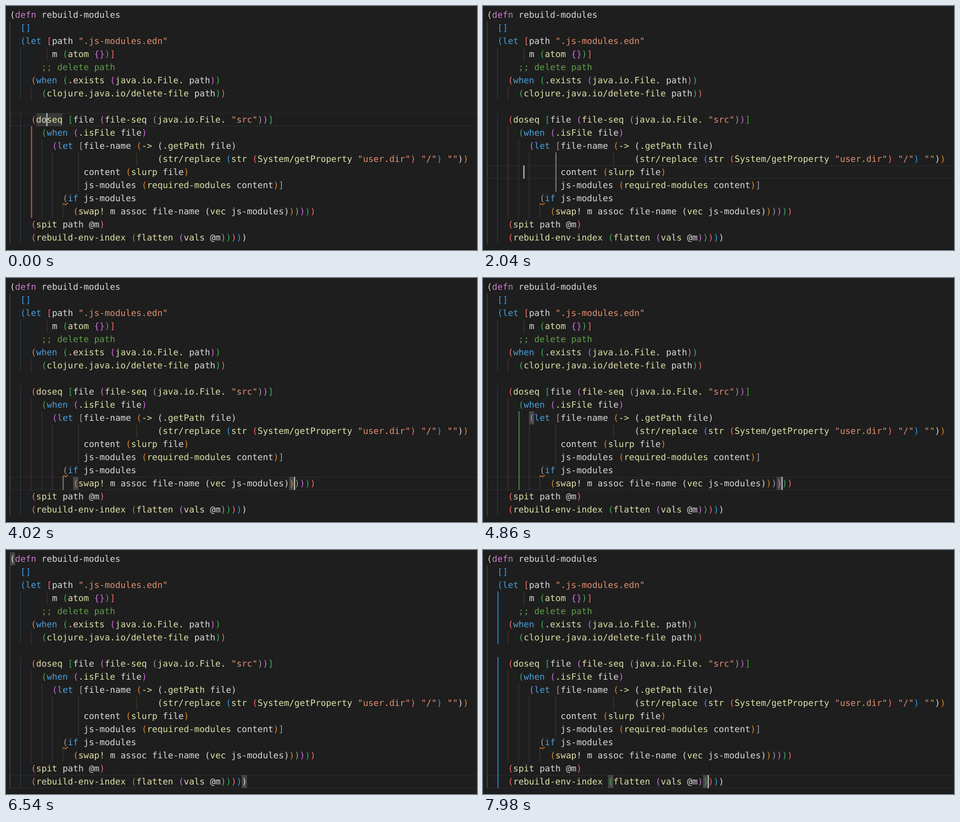
Write an HTML page that moves like this. It is 1038 px wide and 540 px high and loops after 8000 ms.

```html
<!DOCTYPE html>
<html lang="en">
<head>
<meta charset="utf-8">
<title>Cursor and indent guides</title>
<style>
  html, body { margin: 0; width: 100%; height: 100%; overflow: hidden; background: #1e1e1e; }
  svg { display: block; }
  text { font: 19.28px "DejaVu Sans Mono", monospace; text-rendering: geometricPrecision; }
</style>
</head>
<body>
<svg id="stage" width="1038" height="540" viewBox="0 0 1038 540">
  <rect width="1038" height="540" fill="#1e1e1e"/>
  <rect y="538" width="1038" height="2" fill="#171717"/>
  <g id="under"></g>
  <g id="guides"></g>
  <g id="code"></g>
  <path d="M125 440q2 -4 4 -1.5t4 0t4 -1.5" fill="none" stroke="#d8862a" stroke-width="1.6"/>
  <rect id="cursor" width="2.4" height="29" fill="#c4c4c4"/>
</svg>
<script>
const SOURCE = `(defn rebuild-modules
  []
  (let [path ".js-modules.edn"
        m (atom {})]
      ;; delete path
    (when (.exists (java.io.File. path))
      (clojure.java.io/delete-file path))

    (doseq [file (file-seq (java.io.File. "src"))]
      (when (.isFile file)
        (let [file-name (-> (.getPath file)
                            (str/replace (str (System/getProperty "user.dir") "/") ""))
              content (slurp file)
              js-modules (required-modules content)]
          (if js-modules
            (swap! m assoc file-name (vec js-modules))))))
    (spit path @m)
    (rebuild-env-index (flatten (vals @m)))))`.split('\n');

const LOOP = 8000, BLINK = 500;
const LEFT = 8.5, TOP = 5, CHAR = 11.615, LINE = 29, BASELINE = 21.3;
const RAINBOW = ['#d8d8d8', '#2f9ce4', '#ee6a64', '#3bae50', '#cf6be0', '#999999', '#d8862a'];
const INK = { plain: '#dadada', call: '#dfdfa8', keyword: '#4a9fdc', define: '#c77fc6',
              string: '#df8f70', comment: '#5f9c4b' };

// Cursor stops: time, row, column
const STEPS = [
  [0, 8, 7], [840, 9, 7], [1320, 10, 7], [1680, 11, 7], [2040, 12, 7], [2400, 13, 7],
  [2640, 14, 7], [2880, 15, 7],
  [3540, 15, 54], [4140, 15, 55], [4680, 15, 56], [5160, 15, 57], [5460, 15, 58],
  [5700, 16, 18], [5880, 17, 45], [6900, 17, 44], [7320, 17, 43], [7740, 17, 42]
];

const $ = id => document.getElementById(id);
const x = col => LEFT + col * CHAR;
const y = row => TOP + row * LINE;

function add(parent, name, attrs, text = '') {
  const node = document.createElementNS('http://www.w3.org/2000/svg', name);
  for (const key in attrs) node.setAttribute(key, attrs[key]);
  node.textContent = text;
  return parent.appendChild(node);
}

const forms = [], symbols = [];

function symbolInk(word, isHead) {
  if (word === 'defn') return INK.define;
  if (/^(let|when|if)$/.test(word)) return INK.keyword;
  return isHead ? INK.call : INK.plain;
}

function drawCode() {
  const open = [];
  SOURCE.forEach((line, row) => {
    for (const match of line.matchAll(/;;.*|"[^"]*"|[()[\]{}]|[^\s()[\]{}"]+/g)) {
      const word = match[0], col = match.index;
      let fill;
      if (word.startsWith(';;')) fill = INK.comment;
      else if (word[0] === '"') fill = INK.string;
      else if ('([{'.includes(word)) {
        fill = RAINBOW[open.length % RAINBOW.length];
        const form = { row, col, color: fill, guides: [] };
        open.push(form);
        forms.push(form);
      } else if (')]}'.includes(word)) {
        const form = open.pop();
        fill = form.color;
        form.endRow = row;
        form.endCol = col;
      } else {
        fill = symbolInk(word, line[col - 1] === '(');
        symbols.push({ word, row, col });
      }
      add($('code'), 'text', { x: x(col), y: y(row) + BASELINE, fill }, word);
    }
  });
}

function drawGuides() {
  for (const form of forms) {
    for (let row = form.row + 1; row <= form.endRow; row++) {
      if (form.col && SOURCE[row].length <= form.col) continue;
      form.guides.push(add($('guides'), 'rect',
        { x: x(form.col), y: y(row), height: LINE, fill: form.color }));
    }
  }
}

const encloses = (form, row, col) =>
  (row > form.row || row === form.row && col > form.col) &&
  (row < form.endRow || row === form.endRow && col <= form.endCol);

function mark(row, col, length, fill) {
  add($('under'), 'rect', { x: x(col), y: y(row), width: length * CHAR, height: LINE, fill });
}

function showStep([, row, col]) {
  $('under').replaceChildren();
  add($('under'), 'rect', { x: LEFT, y: y(row) + 0.5, width: 1040, height: LINE - 1,
                            fill: 'none', stroke: '#292929', 'stroke-width': 1.6 });

  const current = symbols.find(s => s.row === row && col >= s.col && col <= s.col + s.word.length);
  for (const s of symbols)
    if (current && s.word === current.word) mark(s.row, s.col, s.word.length, '#373939');

  const closed = forms.find(f => f.endRow === row && f.endCol === col - 1);
  if (closed) {
    mark(closed.row, closed.col, 1, '#454745');
    mark(closed.endRow, closed.endCol, 1, '#454745');
  }

  const active = forms.filter(f => f.guides.length && encloses(f, row, col)).pop();
  for (const form of forms)
    for (const guide of form.guides) {
      guide.setAttribute('width', form === active ? 2.6 : 1.2);
      guide.setAttribute('opacity', form === active ? 0.7 : 0.28);
    }

  $('cursor').setAttribute('x', x(col) - 0.9);
  $('cursor').setAttribute('y', y(row));
}

let shown;
function frame() {
  const time = performance.now() % LOOP;
  const step = STEPS.findLast(s => s[0] <= time);
  if (step !== shown) showStep(shown = step);
  const isOn = Math.floor((time - step[0]) / BLINK) % 2 === 0;
  $('cursor').setAttribute('opacity', isOn ? 1 : 0);
  requestAnimationFrame(frame);
}

drawCode();
drawGuides();
frame();
</script>
</body>
</html>
```
